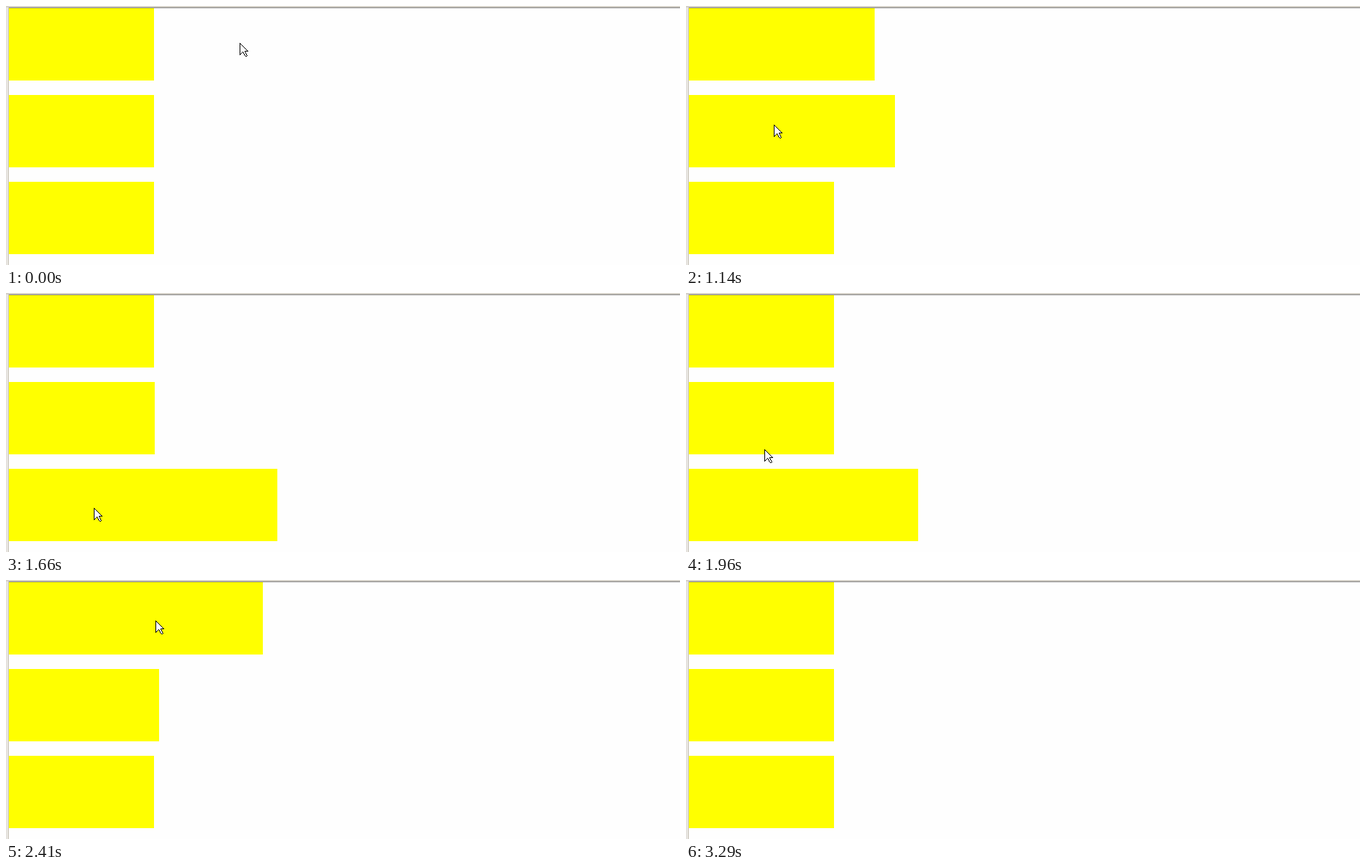
An HTML page with a canvas that plays this animation: 929 px wide and 358 px high, repeating every 3.73 s.

```html
<!DOCTYPE html>
<html>
<head>
<meta charset="utf-8">
<style>
html, body { margin: 0; width: 929px; height: 358px; overflow: hidden; background: #fefefe; }
canvas { display: block; }
</style>
</head>
<body>
<canvas id="stage" width="929" height="358"></canvas>
<script>
const ctx = document.getElementById('stage').getContext('2d');
const LOOP = 3730, START = 500, STEP = 58, LAST = 48;
const DURATION = 400 / STEP; // hover transition, in steps

// Per box: [pointer enters, pointer leaves], in steps
const hovers = [
  [[2.8, 8.19], [29.88, 37.2]],
  [[9.24, 14.11], [25, 28.68]],
  [[16.18, 23.24]]
];

// Turning points of the pointer: [step, x, y]
const track = [
  [-1, 322, 51], [4, 130, 72], [9, 118, 124], [11, 121, 164], [17, 126, 280], [20, 121, 297],
  [25, 108, 216], [29, 99, 116], [33, 206, 56], [39, 500, 125], [47, 782, 344]
];

// cubic-bezier(.25, .1, .25, 1)
function ease(p) {
  if (p <= 0) return 0;
  if (p >= 1) return 1;
  let lo = 0, hi = 1;
  for (let i = 0; i < 24; i++) {
    const s = (lo + hi) / 2;
    if (.75 * s * (1 - s) + s ** 3 < p) lo = s; else hi = s;
  }
  return .3 * lo * (1 - lo) ** 2 + 3 * lo * lo * (1 - lo) + lo ** 3;
}

// An interrupted transition reverses in proportionally less time
function growth(k, [enter, leave]) {
  const peak = ease((Math.min(k, leave) - enter) / DURATION);
  return k > leave ? peak * (1 - ease((k - leave) / (DURATION * peak))) : peak;
}

function pointerAt(k) {
  const i = Math.max(1, track.findIndex(p => p[0] >= k));
  const [a, b] = [track[i - 1], track[i]];
  const u = (k - a[0]) / (b[0] - a[0]);
  return [1, 2].map(n => Math.round(a[n] + (b[n] - a[n]) * u));
}

function rect(color, x, y, w, h) {
  ctx.fillStyle = color;
  ctx.fillRect(x, y, w, h);
}

// One outlined pixel row of the pointer
function row(x, y, w) {
  rect('#000', x, y, w, 1);
  if (w > 2) rect('#fff', x + 1, y, w - 2, 1);
}

function drawPointer(x, y) {
  ctx.save();
  ctx.translate(x, y);
  for (let i = 0; i < 17; i++) row(0, i, i < 12 ? i + 1 : 17 - i);
  rect('#000', 7, 11, 5, 1);
  for (let i = 12; i < 18; i++) row(4 + (i - 11 >> 1), i, 4);
  row(8, 18, 2);
  ctx.restore();
}

function draw(t) {
  const k = t < START ? -1 : Math.floor((t - START) / STEP + .12);
  rect('#fefefe', 0, 0, 929, 358);
  rect('#d4d0c8', 0, 0, 929, 2);
  rect('#d4d0c8', 0, 0, 1, 358);
  rect('#d4d0c8', 2, 2, 2, 356);
  rect('#808080', 4, 2, 925, 1);

  hovers.forEach((spans, i) => {
    const grown = spans.reduce((sum, span) => sum + growth(k, span), 0);
    rect('#ff0', 4, 3 + 120 * i, Math.round(200 + 200 * grown), 100);
  });

  if (k < LAST) drawPointer(...pointerAt(k));
}

const origin = performance.now();
function tick() {
  draw((performance.now() - origin) % LOOP);
  requestAnimationFrame(tick);
}
tick();
</script>
</body>
</html>
```
